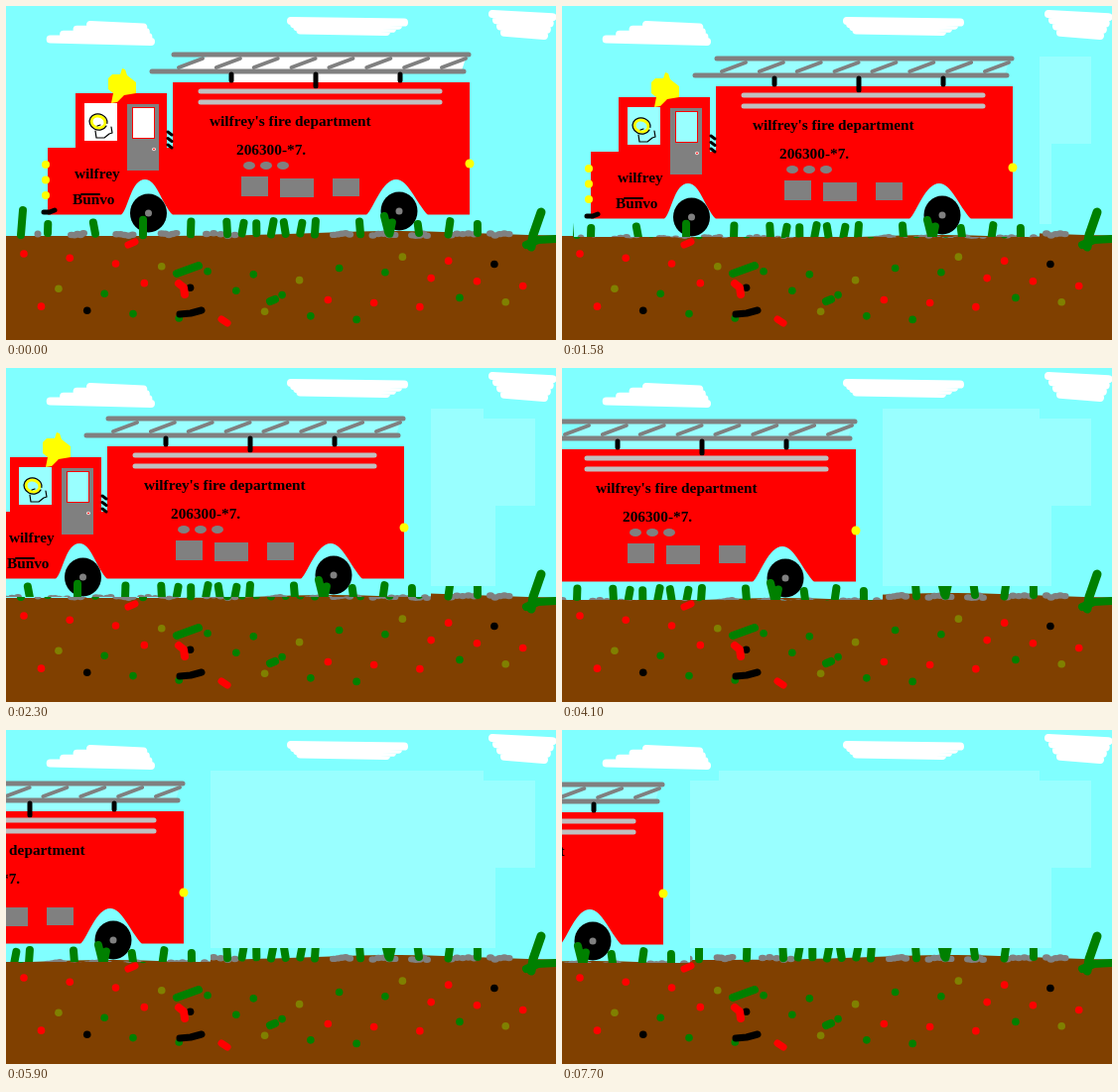
These frames come from a looping animation (554 by 337 pixels, 8000 ms). An HTML page with a canvas:

```html
<!DOCTYPE html>
<html lang="en">
<head>
<meta charset="utf-8">
<title>Fire truck</title>
<style>
html, body { margin: 0; width: 100%; height: 100%; overflow: hidden; background: #80ffff; }
canvas { display: block; }
</style>
</head>
<body>
<canvas id="stage" width="554" height="337"></canvas>
<script>
const ctx = document.getElementById('stage').getContext('2d');
const W = 554, H = 337, LOOP = 8000, FIRST = 500, HOLD = 1800;
const SKY = '#80ffff', PALE = '#99ffff', WHITE = '#ffffff', BLACK = '#000000';
const GRAY = '#808080', SILVER = '#c0c0c0', BROWN = '#804000';
const RED = '#ff0000', GREEN = '#008000', YELLOW = '#ffff00', OLIVE = '#808000';

// truck offset at each jump
const JUMPS = [[0, 0], [-13, 4], [-66, 2], [-171, 5], [-288, 5], [-365, 6]];

function seeded(seed) {
  return () => (seed = seed * 16807 % 2147483647) / 2147483647;
}

function rect(color, x1, y1, x2, y2) {
  ctx.fillStyle = color;
  ctx.fillRect(x1, y1, x2 - x1, y2 - y1);
}

function trace(pts) {
  ctx.beginPath();
  for (let i = 0; i < pts.length; i += 2) ctx.lineTo(pts[i], pts[i + 1]);
}

function shape(color, ...pts) {
  ctx.fillStyle = color;
  trace(pts);
  ctx.fill();
}

function line(color, width, ...pts) {
  ctx.strokeStyle = color;
  ctx.lineWidth = width;
  trace(pts);
  ctx.stroke();
}

function oval(color, x, y, rx, ry = rx) {
  ctx.fillStyle = color;
  ctx.beginPath();
  ctx.ellipse(x, y, rx, ry, 0, 0, Math.PI * 2);
  ctx.fill();
}

function label(str, x, y) {
  ctx.fillStyle = BLACK;
  ctx.fillText(str, x, y);
}

// call fn for n evenly spread positions
function spread(from, to, n, fn) {
  for (let i = 0; i < n; i++) fn(from + (to - from) * i / (n - 1), i);
}

// scribbled cloud, from its top stroke to its bottom stroke
function cloud(top, topL, topR, bottom, bottomL, bottomR) {
  const pts = [];
  spread(0, 1, 8, (k, i) => {
    const l = topL + (bottomL - topL) * k, r = topR + (bottomR - topR) * k;
    pts.push(i % 2 ? r : l, top + (bottom - top) * k);
  });
  line(WHITE, 8, ...pts);
}

function ground() {
  const pts = [];
  spread(0, W, 40, x => pts.push(x, 232 - 5 * Math.exp(-(((x - 390) / 110) ** 2))));
  shape(BROWN, ...pts, W, H, 0, H);
}

function stones() {
  const rnd = seeded(5);
  const run = x => {
    const len = 12 + rnd() * 18;
    spread(x, x + len, 5, px => oval(GRAY, px, 229 + rnd() * 3, 4, 3.2));
  };
  spread(66, 202, 4, run);
  spread(330, 488, 5, run);
  oval(GRAY, 32, 230, 3.5);
}

function grass() {
  const rnd = seeded(11);
  const blade = x => {
    const h = 10 + rnd() * 5, lean = (rnd() - 0.4) * 6;
    line(GREEN, 8, x, 224 + h / 2, x + lean, 230 - h);
  };
  line(GREEN, 8, 15, 231, 17, 206);
  spread(42, 186, 4, blade);
  spread(223, 311, 7, blade);
  spread(357, 475, 5, blade);
  line(GREEN, 8, 385, 228, 381, 212);
}

function pebbles() {
  const colors = [RED, GREEN, RED, GREEN, OLIVE, RED, GREEN, BLACK, OLIVE, GREEN, RED];
  const rnd = seeded(23);
  for (let i = 0; i < 33; i++) {
    const x = 18 + i * 0.618 % 1 * 514, y = 250 + 68 * ((i * 7 % 33) + rnd()) / 33;
    oval(colors[i % colors.length], x, y, 3.8);
  }
  line(RED, 7, 123, 241, 130, 238);
  line(RED, 8, 174, 280, 179, 284, 180, 291);
  line(RED, 7, 217, 316, 223, 320);
  line(GREEN, 8, 172, 270, 194, 262);
  line(GREEN, 8, 266, 298, 271, 296);
  line(BLACK, 7, 175, 311, 186, 310, 197, 307);
}

function cornerGrass() {
  line(GREEN, 9, 529, 243, 531, 231, 539, 208);
  line(GREEN, 8, 524, 241, 536, 236, W, 235);
}

// glass is the colour that shows through the gaps
function ladder(glass) {
  shape(glass, 204, 50, 464, 50, 459, 65, 173, 65);
  rect(glass, 228, 68, 397, 77);
  spread(174, 439, 8, x => line(GRAY, 4, x, 62, x + 24, 53));
  line(GRAY, 5, 169, 49, 466, 49);
  line(GRAY, 5, 147, 66, 461, 66);
  spread(227, 397, 3, (x, i) => line(BLACK, 5, x, 69, x, i === 1 ? 81 : 75));
}

function arch(left, peak, right) {
  ctx.fillStyle = SKY;
  ctx.beginPath();
  ctx.moveTo(left, 211);
  ctx.bezierCurveTo(left + 8, 203, peak - 14, 175, peak, 175);
  ctx.bezierCurveTo(peak + 12, 175, right - 12, 198, right, 211);
  ctx.fill();
}

function wheel(x, y) {
  oval(BLACK, x, y, 18.5, 19.5);
  oval(GRAY, x, y, 3.5);
}

function driver() {
  for (const [color, width, r] of [[YELLOW, 3, 7], [BLACK, 1.2, 9]]) {
    ctx.strokeStyle = color;
    ctx.lineWidth = width;
    ctx.beginPath();
    ctx.ellipse(93, 117, r, r - 1, 0.3, 0.2, Math.PI * 1.95);
    ctx.stroke();
  }
  line(BLACK, 1.2, 92, 121, 95, 120);
  line(BLACK, 1.2, 90, 126, 91, 133, 99, 133, 104, 129, 107, 128, 106, 122);
}

function cab(glass) {
  rect(glass, 79, 98, 112, 136);
  driver();
  rect(GRAY, 122, 99, 154, 166);
  rect(RED, 127, 102, 150, 134);
  rect(glass, 128, 103, 149, 133);
  oval(WHITE, 149, 144.5, 1.8);
  oval(RED, 149, 144.5, 0.9);
  spread(127, 140, 3, y => line(BLACK, 3, 163, y, 167, y + 3));
  shape(YELLOW, 103, 73, 107, 69, 115, 69, 117, 63, 120, 64, 122, 70, 131, 77, 131, 88,
    119, 90, 112, 97, 106, 98, 108, 88, 103, 84);
  spread(160, 191, 3, y => oval(YELLOW, 40, y, 4));
  line(BLACK, 5, 38, 208, 44, 208, 49, 206);
}

function truck(glass) {
  shape(RED, 42, 143, 70, 143, 70, 88, 162, 88, 162, 143, 168, 143, 168, 77, 467, 77, 467, 210.5, 42, 210.5);
  ladder(glass);
  arch(116, 140, 168);
  arch(363, 393, 425);
  wheel(143.5, 209);
  wheel(396, 207);
  cab(glass);

  spread(86, 97, 2, y => line(SILVER, 5, 196, y, 437, y));
  spread(245, 279, 3, x => oval(GRAY, x, 161, 6, 4));
  rect(GRAY, 237, 172, 264, 192);
  rect(GRAY, 276, 174, 310, 193);
  rect(GRAY, 329, 174, 356, 192);
  oval(YELLOW, 467, 159, 4.5);

  label("wilfrey's fire department", 205, 121);
  label('206300-*7.', 232, 150);
  label('wilfrey', 69, 174);
  label('Bunvo', 67, 200);
  line(BLACK, 2, 76, 190, 94, 190);
}

function scenery(glass) {
  ground();
  stones();
  truck(glass);
  grass();
}

// flat area left behind the cut-out
function cleared(left) {
  ctx.save();
  ctx.beginPath();
  ctx.rect(left, 0, W, H);
  ctx.clip();
  rect(PALE, 158, 41, 481, 220);
  rect(PALE, 129, 51, 493, 220);
  rect(PALE, 481, 51, 533, 139);
  ctx.restore();
}

// truck and grass move together as one cut-out piece
function cutout(dx, dy) {
  ctx.save();
  ctx.translate(dx, dy);
  ctx.beginPath();
  ctx.rect(25, 41, 469, 188);
  ctx.clip();
  rect(SKY, 25, 41, 494, 229);
  scenery(PALE);
  ctx.restore();
}

function draw(t) {
  const step = t < FIRST ? 0 : 1 + Math.floor((t - FIRST) / HOLD);
  const [dx, dy] = JUMPS[step];
  rect(SKY, 0, 0, W, H);
  cloud(19, 85, 137, 36, 38, 146);
  cloud(15, 287, 404, 26, 298, 383);
  cloud(8, 490, 552, 30, 504, 542);
  if (step === 0) {
    scenery(WHITE);
  } else {
    ground();
    stones();
    grass();
    cleared(494 + dx);
    cutout(dx, dy);
  }
  pebbles();
  cornerGrass();
}

ctx.lineCap = ctx.lineJoin = 'round';
ctx.font = 'bold 15.3px "Liberation Serif", "Times New Roman", serif';

const start = performance.now();
function tick() {
  draw((performance.now() - start) % LOOP);
  requestAnimationFrame(tick);
}
tick();
</script>
</body>
</html>
```
